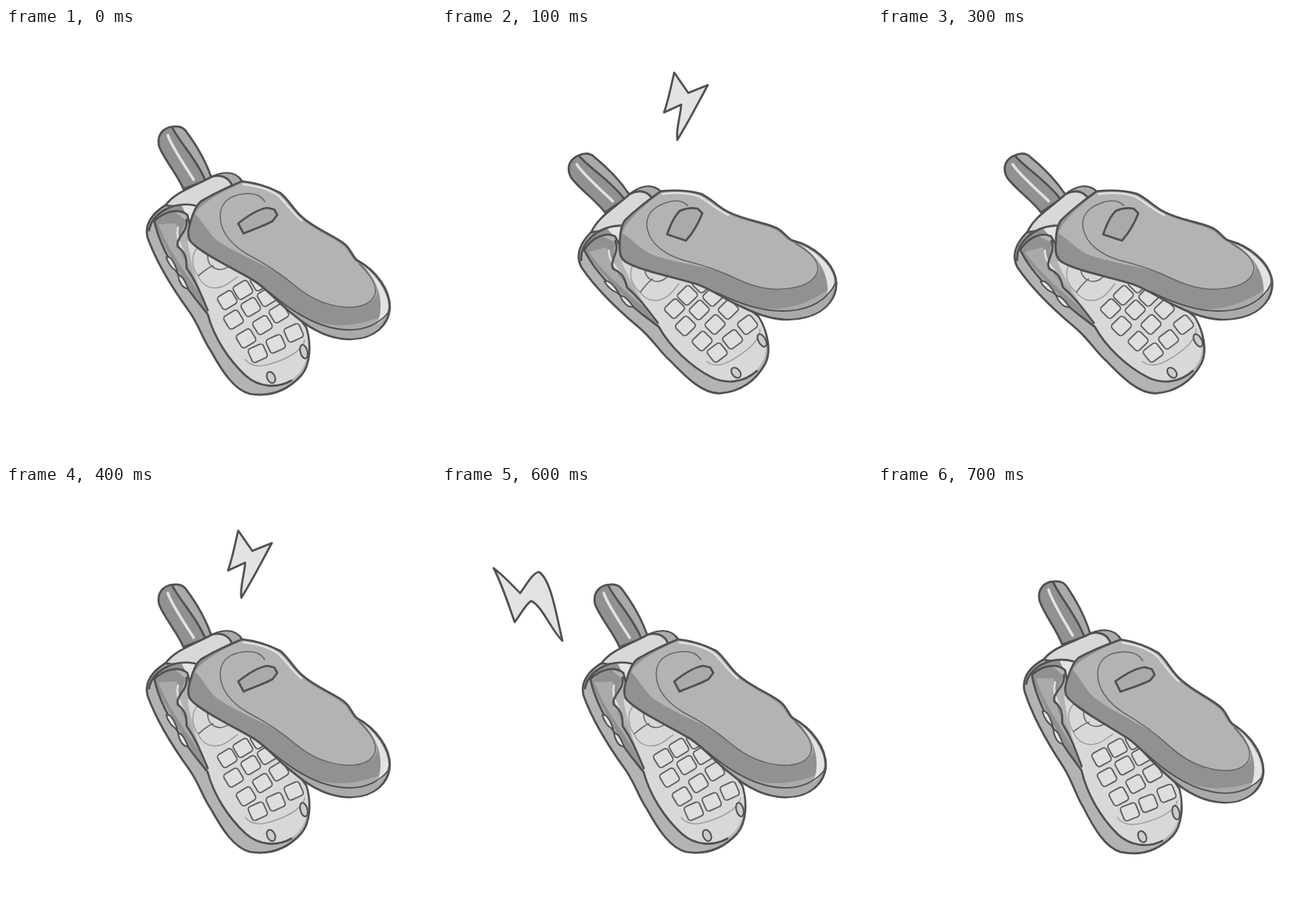
Animation, 550 px wide and 550 px high, one loop 800 ms. Source, as an HTML page:

```html
<!DOCTYPE html>
<html lang="en">
<head>
<meta charset="utf-8">
<title>Ringing phone</title>
<style>
  html, body { margin: 0; width: 100%; height: 100%; overflow: hidden; background: #fff; }
  svg { display: block; width: 100vw; height: 100vh; }
  path { fill: none; stroke-linecap: round; stroke-linejoin: round; }
  .ink { stroke: #505050; stroke-width: 2.7; }
  .thin { stroke: #666; stroke-width: 1.5; }
  .faint { stroke: #9c9c9c; stroke-width: 1.4; }
  .shine { stroke: #e2e2e2; stroke-width: 3.5; }
  .side { fill: #aaa; }
  .dark { fill: #919191; }
  .face { fill: #d8d8d8; }
  .light { fill: #e3e3e3; }
  .top { fill: #b3b3b3; }
</style>
</head>
<body>
<svg viewBox="0 0 550 550">
  <g id="phone">
    <!-- antenna -->
    <path class="ink dark" d="M227 206C219 187 204 171 196 152C192 136 202 127 214 126C222 125 228 128 231 133C246 153 256 172 263 192Z"/>
    <path class="side" d="M213 128C223 126 228 130 231 136C245 155 255 173 261 191L254 194C243 169 225 148 213 128Z"/>
    <path class="ink" d="M213 128C222 146 244 168 255 195"/>
    <path class="shine" d="M207 137C211 150 226 172 240 194"/>

    <!-- lower half -->
    <path class="ink top" d="M205 226C187 237 177 251 181 268C190 293 208 326 234 362C247 380 252 399 262 413C277 440 292 463 312 468C337 472 360 464 378 444C389 431 391 405 384 383L330 310L245 225Z"/>
    <path class="face" d="M232 272C237 305 248 335 258 362C264 393 285 424 307 445C325 459 347 462 369 447C389 431 389 402 383 384L325 305Z"/>
    <path class="dark" d="M190 250C203 281 224 321 256 362C247 335 232 315 230 296C219 280 222 262 231 247L210 230Z"/>
    <path class="side" d="M195 251C204 277 222 302 249 342L236 306L225 292L218 250Z"/>
    <path class="ink" d="M190 248C197 281 220 317 242 346L258 366C266 396 285 425 307 445C324 460 347 461 365 451"/>
    <path class="shine" d="M220 255C216 272 228 284 229 293" style="stroke-width:2.5"/>
    <path class="ink" d="M231 245C233 262 216 268 220 280C230 287 231 296 231 307C243 324 250 342 258 361"/>
    <path class="ink light" style="stroke-width:2" d="M205 293C211 291 216 302 219 311C213 309 207 301 205 293ZM220 316C226 316 229 325 233 333C226 334 221 324 220 316Z"/>

    <!-- keypad -->
    <path class="faint" d="M246 280C236 290 237 305 246 318C252 331 264 335 276 331C285 328 290 322 296 318"/>
    <path class="thin" d="M258 290C257 305 271 316 288 303M246 317C252 312 257 307 265 304"/>
    <g id="keys" fill="#dedede" stroke="#5c5c5c" stroke-width="1.8"></g>
    <path class="faint" d="M306 424C317 438 337 431 354 424C370 417 380 409 382 399"/>
    <g class="ink" fill="#ccc" style="stroke-width:2">
      <ellipse cx="339" cy="447" rx="5" ry="7.5" transform="rotate(-25 339 447)"/>
      <ellipse cx="381" cy="414" rx="4.5" ry="9" transform="rotate(-15 381 414)"/>
    </g>

    <!-- hinge -->
    <path class="ink face" d="M204 227C215 211 237 204 258 193C275 183 293 182 302 196L242 230Z"/>
    <path class="side" d="M266 190C279 184 294 185 300 196L287 201C284 193 276 190 266 190Z"/>
    <path class="ink" d="M264 190C275 187 285 191 289 201"/>
    <path class="dark" d="M183 254C189 234 212 220 242 227L237 244C220 229 204 234 190 247Z"/>
    <path class="light" d="M224 226L243 225L236 249Z"/>
    <path class="ink" d="M183 259C186 239 211 221 242 227M190 247C203 234 221 230 232 239L235 251"/>

    <!-- lid -->
    <path class="ink dark" d="M302 196C320 198 336 203 351 211C363 221 368 233 379 242C397 258 421 266 434 277C441 283 443 292 449 297C475 311 491 336 491 357C490 381 470 397 442 398C414 399 389 385 368 367C347 351 337 336 317 323C290 307 255 291 239 276C231 270 232 260 236 248C239 237 243 227 249 222C265 212 285 203 302 196Z"/>
    <path class="top" d="M242 238C247 226 274 210 302 198C320 200 336 204 350 213C361 222 367 234 378 244C396 260 420 268 432 279C439 285 441 294 448 299C464 312 477 328 474 341C469 355 448 359 423 357C395 351 374 331 355 318C327 300 301 292 275 275C260 266 253 248 242 238Z"/>
    <path class="side" d="M345 345C385 379 425 393 488 366C482 386 464 397 442 397C405 397 380 376 345 345Z"/>
    <path class="light" d="M456 303C476 318 490 342 489 357C487 369 481 374 475 379C484 354 479 327 456 303Z"/>
    <path class="shine" d="M304 200C322 202 338 207 349 215C360 226 366 236 378 246" style="stroke-width:2.5"/>
    <path class="thin" d="M331 222C325 212 314 211 305 212C285 214 274 224 274 241C274 260 288 277 308 289C329 300 348 311 370 330C389 346 416 359 445 357C466 355 478 343 470 325C466 317 460 310 452 302"/>
    <path class="ink" style="stroke-width:1.8" d="M338 339C362 359 391 380 425 385C451 389 474 382 488 365"/>
    <path id="wide" class="ink side" d="M297 250C307 242 321 232 334 230L343 232L347 239L341 247C328 254 315 258 304 263Z"/>
  </g>
  <path id="tall" class="ink side" d="M288 264C292 252 298 240 304 234Q315 229 327 231L333 237C328 250 321 262 312 272Z"/>

  <path id="right" class="ink light" d="M297 57L315 83L340 73C328 95 316 119 301 143C299 129 305 113 306 98L284 108C290 91 293 74 297 57Z"/>
  <path id="left" class="ink light" d="M66 105C78 114 89 126 100 137C108 126 117 110 124 110C139 119 146 163 154 198C140 185 128 153 114 147C107 151 99 167 93 174C85 152 77 126 66 105Z"/>
</svg>
<script>
const $ = id => document.getElementById(id);

const keys = [
  [283, 348], [303, 335], [325, 324],
  [291, 373], [313, 357], [334, 344],
  [307, 397], [328, 380], [349, 365],
  [322, 416], [345, 404], [368, 390]
];
$('keys').innerHTML = keys.map(([x, y], i) =>
  `<rect x="-10.5" y="-9.5" width="21" height="19" rx="4"
    transform="translate(${x} ${y}) rotate(${i < 9 ? -31 : -24})"/>`).join('');

const poses = {
  rest: '',
  tilt: 'matrix(.98 -.232 .24 .9586 -63.4 91.1)',
  lean: 'matrix(.997 .05 -.038 .998 17 -14.5)'
};
// pose and lightning bolt for each 100 ms step
const steps = [
  ['rest'], ['tilt', 'right'], ['rest', 'left'], ['tilt'],
  ['rest', 'right'], ['tilt'], ['rest', 'left'], ['lean']
];

const show = (id, on) => $(id).setAttribute('visibility', on ? 'visible' : 'hidden');

function draw(now) {
  const [pose, bolt] = steps[Math.floor(now / 100) % steps.length];
  $('phone').setAttribute('transform', poses[pose]);
  show('wide', pose !== 'tilt');
  show('tall', pose === 'tilt');
  show('right', bolt === 'right');
  show('left', bolt === 'left');
}

let start;
function tick(now) {
  start ??= now;
  draw(now - start);
  requestAnimationFrame(tick);
}
draw(0);
requestAnimationFrame(tick);
</script>
</body>
</html>
```
